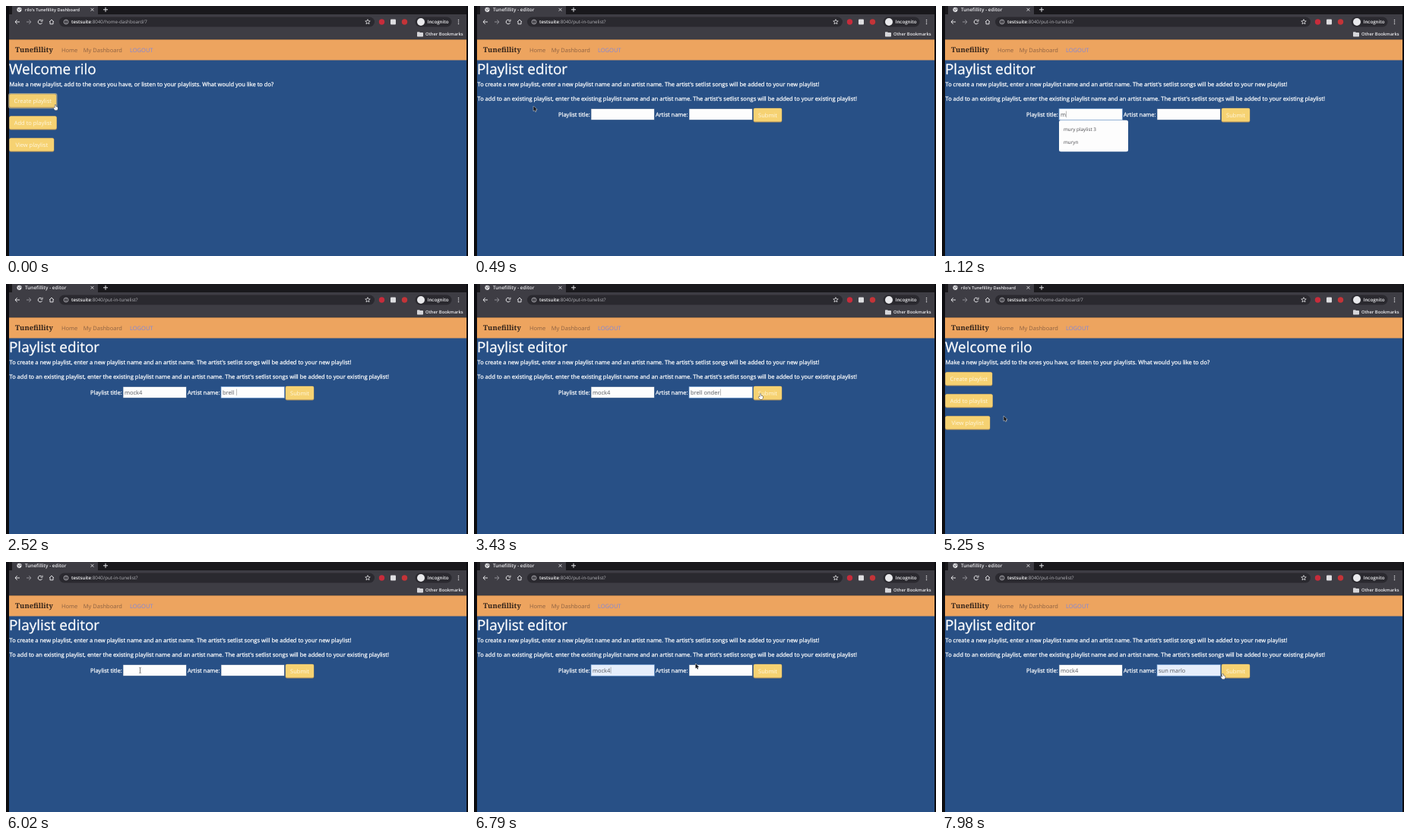
These frames come from a looping animation (608x330 px, 8 s). An HTML page with a canvas:

```html
<!DOCTYPE html>
<html lang="en">
<head>
<meta charset="utf-8">
<title>Playlist editor</title>
<style>
html, body { margin: 0; width: 100%; height: 100%; overflow: hidden; background: #0c0c10; }
canvas { display: block; width: 608px; height: 330px; }
</style>
</head>
<body>
<canvas id="stage"></canvas>
<script>
const W = 608, H = 330, LOOP = 8000;
const canvas = document.getElementById('stage');
const dpr = window.devicePixelRatio || 1;
canvas.width = W * dpr;
canvas.height = H * dpr;
const c = canvas.getContext('2d');
const SANS = '"Open Sans", "Noto Sans", sans-serif';
const SERIF = '"Noto Serif", serif';

const BRAND = 'Tunefillity';
const USER = 'rilo';
const TITLE = 'mock4';
const ARTIST1 = 'brell onder';
const ARTIST2 = 'sun marlo';
const TITLE_LIST = [TITLE, 'mury playlist 3', 'muryn', 'road trip', 'slow songs', 'night mix'];
const ARTIST_LIST = [ARTIST1, ARTIST2, 'the low tiles', 'ana verrin', 'pale harbor', 'mint orbit'];

const FIELDS = [{ x: 154.5, y: 136, w: 82.5, h: 14 }, { x: 283.5, y: 136, w: 82.5, h: 14 }];
const SUBMIT = { x: 368, y: 135, w: 37, h: 18, label: 'Submit' };
const MENU = [
  { x: 4.5, y: 116.5, w: 61.5, h: 17.5, label: 'Create playlist' },
  { x: 4.5, y: 145.5, w: 62, h: 17.5, label: 'Add to playlist' },
  { x: 4.5, y: 174.5, w: 58.5, h: 17.5, label: 'View playlist' }
];

// Pointer hot spot: time, x, y
const PATH = [
  [0, 65, 130.5], [300, 64, 130], [480, 78, 132], [820, 175, 143], [1740, 175, 143],
  [1880, 300, 144], [3060, 316, 145], [3380, 377, 145], [3620, 377, 145], [3850, 372, 147],
  [4200, 341, 160.5], [4420, 341, 160.5], [4720, 270, 185], [5000, 150, 212], [5400, 50, 157],
  [5680, 48, 156], [5980, 176.5, 143], [6520, 176.5, 143], [6640, 190, 163], [6700, 190, 163],
  [6790, 291.5, 134], [7050, 305, 143], [7320, 305, 143], [7480, 306, 180], [7560, 306, 180],
  [7900, 369.5, 147.5], [8000, 369.5, 147.5]
];

const between = (t, a, b) => t >= a && t < b;
const inside = (p, r) => p.x >= r.x && p.x <= r.x + r.w && p.y >= r.y && p.y <= r.y + r.h;

// Part of a string typed between two times
function typed(s, t, from, to) {
  const n = Math.floor((t - from) / (to - from) * (s.length - 1)) + 1;
  return s.slice(0, Math.max(0, n));
}

function pointer(t) {
  let i = 0;
  while (i < PATH.length - 2 && t >= PATH[i + 1][0]) i++;
  const [t0, x0, y0] = PATH[i], [t1, x1, y1] = PATH[i + 1];
  let k = (t - t0) / (t1 - t0);
  k = k * k * (3 - 2 * k);
  return { x: x0 + (x1 - x0) * k, y: y0 + (y1 - y0) * k };
}

function text(s, x, y, size, color, weight = 400, family = SANS) {
  c.font = `${weight} ${size}px ${family}`;
  c.fillStyle = color;
  c.fillText(s, x, y);
  return c.measureText(s).width;
}

// Page text, slightly thickened like smoothed screen type
function label(s, x, y, size = 7.53) {
  text(s, x, y, size, '#fff');
  c.strokeStyle = '#fff';
  c.lineWidth = 0.25;
  c.strokeText(s, x, y);
}

function rect(x, y, w, h, color) {
  c.fillStyle = color;
  c.fillRect(x, y, w, h);
}

function round(x, y, w, h, r, color) {
  c.beginPath();
  c.roundRect(x, y, w, h, r);
  c.fillStyle = color;
  c.fill();
}

function disc(x, y, r, color) {
  c.beginPath();
  c.arc(x, y, r, 0, 7);
  c.fillStyle = color;
  c.fill();
}

function line(points, color, width = 1) {
  c.beginPath();
  points.forEach(([x, y], i) => i ? c.lineTo(x, y) : c.moveTo(x, y));
  c.strokeStyle = color;
  c.lineWidth = width;
  c.stroke();
}

function arc(x, y, r, a, b, color, width = 1) {
  c.beginPath();
  c.arc(x, y, r, a, b);
  c.strokeStyle = color;
  c.lineWidth = width;
  c.stroke();
}

function cross(x, y, r, color, width) {
  line([[x - r, y - r], [x + r, y + r]], color, width);
  line([[x + r, y - r], [x - r, y + r]], color, width);
}

function star(x, y, r, color) {
  const pts = [];
  for (let i = 0; i <= 10; i++) {
    const a = -Math.PI / 2 + i * Math.PI / 5, q = i % 2 ? r * 0.45 : r;
    pts.push([x + q * Math.cos(a), y + q * Math.sin(a)]);
  }
  line(pts, color, 0.8);
}

function browser(t, onDash, loading) {
  const ink = '#e2e2e5', bar = '#3e3d44', pill = '#2a292f';
  rect(4, 0, 602, 11, '#19181c');
  round(8, -4, 113, 18, 3, bar);
  rect(4, 11, 602, 33.3, bar);

  if (loading) {
    const a = t / 160;
    arc(17.5, 4.8, 2.8, a, a + 4.5, '#c9ccd2', 1);
  } else {
    disc(17.5, 4.8, 3.1, '#e6e6e9');
    line([[15.6, 3.8], [17.4, 4.8], [16.8, 6.8]], '#55555b', 0.9);
    line([[18.2, 2.5], [18.8, 4.2], [20, 4.8]], '#55555b', 0.8);
  }
  if (onDash) text(`${USER}'s ${BRAND} Dashboard`, 25, 6.8, 5.6, '#ededf0', 600);
  else text(`${BRAND} - editor`, 25, 6.8, 6.4, '#ededf0', 600);
  cross(113.5, 4.8, 1.9, ink, 0.9);
  line([[128, 4.8], [134, 4.8]], ink);
  line([[131, 1.8], [131, 7.8]], ink);

  line([[18, 21], [12, 21]], ink);
  line([[14.7, 18.2], [12, 21], [14.7, 23.8]], ink);
  line([[27, 21], [33, 21]], '#8f8f95');
  line([[30.3, 18.2], [33, 21], [30.3, 23.8]], '#8f8f95');
  if (loading) cross(45, 21, 2.7, ink, 1.1);
  else {
    arc(45, 21, 2.8, 0.4, 5.4, ink, 1);
    line([[48, 17.7], [48, 20.2], [45.6, 20.2]], ink, 0.9);
  }
  line([[57, 21], [60, 18], [63, 21]], ink);
  line([[58, 20.5], [58, 23.8], [62, 23.8], [62, 20.5]], ink);

  round(70, 14.5, 415, 13, 6.5, pill);
  arc(79, 21, 2.9, 0, 7, '#c4c4c9', 0.8);
  line([[79, 20.5], [79, 22.7]], '#c4c4c9', 0.9);
  rect(78.6, 19, 0.9, 0.9, '#c4c4c9');
  const host = text('testsuite', 86, 23.3, 6.2, '#f4f4f6', 600);
  text(':8040/' + (onDash ? 'home-dashboard/7' : 'put-in-tunelist?'), 86 + host, 23.3, 6.2, '#b2b2b8');
  star(476, 21, 3.4, ink);

  disc(494.5, 21, 3.7, '#c72c3b');
  round(506, 17.5, 7, 7, 1, '#dedee1');
  disc(524.5, 21, 3.7, '#c43438');
  round(538.5, 14.5, 48, 13, 6.5, pill);
  disc(546, 21, 5, '#e9e9ec');
  text('Incognito', 554.5, 23.2, 6.2, '#f2f2f4', 600);
  for (const y of [18.5, 21, 23.5]) disc(595.5, y, 0.75, ink);

  round(541, 34.2, 3.6, 2, 0.5, '#d6d6da');
  round(541, 35, 8, 5.4, 0.7, '#d6d6da');
  text('Other Bookmarks', 552, 39.3, 5.8, '#ececef', 600);
}

function navbar() {
  rect(4, 44.3, 602, 27.2, '#eda45f');
  text(BRAND, 12, 61.3, 9.4, '#35251b', 600, SERIF);
  text('Home', 73, 61, 7.5, '#8c6143');
  text('My Dashboard', 101.8, 61, 7.5, '#8c6143');
  text('LOGOUT', 163, 60.7, 7.5, '#7c86e0', 500);
}

function button(b, active) {
  if (active) round(b.x - 1.5, b.y - 1.5, b.w + 3, b.h + 3, 3, 'rgba(214,203,164,.6)');
  round(b.x - 0.3, b.y - 0.2, b.w + 0.6, b.h + 0.6, 2, '#b9965a');
  round(b.x, b.y, b.w, b.h - 0.4, 2, active ? '#f2cf70' : '#f6d272');
  c.textAlign = 'center';
  text(b.label, b.x + b.w / 2, b.y + b.h / 2 + 2.8, 7.5, '#fff7e0');
  c.textAlign = 'left';
}

function field(f, value, focused, filled, caret) {
  const edge = focused ? 0.7 : 0.4;
  rect(f.x - edge, f.y - edge, f.w + 2 * edge, f.h + 2 * edge, focused ? '#8db4e2' : '#8796ab');
  rect(f.x, f.y, f.w, f.h, filled ? '#e6eefb' : '#fdfdfd');
  const w = text(value, f.x + 1.5, f.y + 9.6, 7.5, '#55585e');
  if (caret) rect(f.x + 2 + w, f.y + 2.6, 0.5, 8.6, '#777');
}

function dropdown(f, items, hot) {
  const h = items.length * 17 + 7.5;
  round(f.x - 0.5, 150.8, 91, h, 2.5, '#fdfdfd');
  items.forEach((s, i) => {
    const y = 154.5 + i * 17;
    if (i === hot) rect(f.x - 0.5, y, 91, 17, '#e8e8ea');
    text(s, f.x + 5.5, y + 10.7, 6.3, '#48484c');
  });
}

function dashboard(p) {
  label('Welcome ' + USER, 4, 89.6, 18.9);
  label('Make a new playlist, add to the ones you have, or listen to your playlists. What would you like to do?', 4.5, 106);
  MENU.forEach(b => button(b, inside(p, b)));
}

function formState(t) {
  const s = { title: '', artist: '', focus: -1, list: null, hot: -1, filled: -1 };
  if (t < 5000) {
    s.title = typed(TITLE, t, 1050, 1680);
    if (t < 1400) s.title = s.title.slice(0, 1);
    s.artist = t < 2500 ? typed(ARTIST1.slice(0, 6), t, 2170, 2490)
      : ARTIST1.slice(0, 6) + typed(ARTIST1.slice(6), t, 2620, 2980);
    s.focus = between(t, 900, 1880) ? 0 : between(t, 1880, 3550) ? 1 : -1;
    if (between(t, 900, 1050)) s.list = TITLE_LIST;
    else if (between(t, 1050, 1400)) s.list = TITLE_LIST.slice(1, 3);
    else if (between(t, 1900, 2170)) s.list = ARTIST_LIST;
  } else {
    s.title = t >= 6700 ? TITLE : '';
    s.artist = t >= 7540 ? ARTIST2 : '';
    s.focus = between(t, 6430, 7230) ? 0 : t >= 7230 ? 1 : -1;
    if (between(t, 6570, 6700)) s.list = TITLE_LIST;
    else if (between(t, 7270, 7540)) s.list = ARTIST_LIST;
    if (s.list) s.hot = t < 7000 ? (t > 6620 ? 0 : -1) : (t > 7440 ? 1 : -1);
    s.filled = between(t, 6700, 7230) ? 0 : t >= 7540 ? 1 : -1;
  }
  return s;
}

function editor(t) {
  const s = formState(t);
  label('Playlist editor', 4, 89.6, 18.9);
  label("To create a new playlist, enter a new playlist name and an artist name. The artist's setlist songs will be added to your new playlist!", 4.5, 106);
  label("To add to an existing playlist, enter the existing playlist name and an artist name. The artist's setlist songs will be added to your existing playlist!", 4.5, 124.6);
  label('Playlist title:', 111, 145.6);
  label('Artist name:', 239, 145.6);
  [s.title, s.artist].forEach((v, i) => {
    const focused = s.focus === i;
    field(FIELDS[i], v, focused, s.filled === i, focused && s.filled !== 1);
  });
  button(SUBMIT, between(t, 3550, 5000));
  if (s.list) dropdown(FIELDS[s.focus], s.list, s.hot);
}

function shape(points, fill, edge) {
  c.beginPath();
  points.forEach(([x, y], i) => i ? c.lineTo(x, y) : c.moveTo(x, y));
  c.closePath();
  c.lineJoin = 'round';
  c.strokeStyle = edge;
  c.lineWidth = 1;
  c.stroke();
  c.fillStyle = fill;
  c.fill();
}

function cursor(p, onDash) {
  const over = r => inside(p, r);
  c.save();
  c.translate(p.x, p.y);
  if (!onDash && FIELDS.some(over)) {
    line([[-1.3, -3.8], [0, -3.2], [1.3, -3.8]], '#555', 0.7);
    line([[0, -3.2], [0, 3.2]], '#555', 0.8);
    line([[-1.3, 3.8], [0, 3.2], [1.3, 3.8]], '#555', 0.7);
  } else if ((onDash ? MENU : [SUBMIT]).some(over)) {
    shape([[-0.6, 0], [0.5, 0], [0.7, 2.4], [3, 3], [3.2, 5], [2.4, 7], [-0.7, 7], [-2.6, 4.2], [-1.8, 3.6], [-0.6, 4.4]],
      '#fff', '#33363d');
  } else {
    shape([[0, 0], [0, 6.6], [1.5, 5.2], [2.5, 7.5], [3.6, 7], [2.6, 4.8], [4.7, 4.7]], '#17181c', '#eef0f4');
  }
  c.restore();
}

function draw(t) {
  c.setTransform(dpr, 0, 0, dpr, 0, 0);
  c.textRendering = 'geometricPrecision';
  c.lineJoin = 'round';
  const onDash = t < 430 || between(t, 4480, 5690);
  const toDash = between(t, 3700, 4480);
  const loading = toDash || between(t, 320, 430) || between(t, 5560, 5690);
  const p = pointer(t);
  rect(0, 0, W, H, '#0c0c10');
  rect(4, 45, 602, 285, '#285086');
  browser(t, onDash || toDash, loading);
  navbar();
  if (onDash) dashboard(p);
  else editor(t);
  const hidden = between(t, 1050, 1740) || between(t, 2170, 3060);
  if (!hidden) cursor(p, onDash);
}

const start = performance.now();
function tick() {
  draw((performance.now() - start) % LOOP);
  requestAnimationFrame(tick);
}
tick();
</script>
</body>
</html>
```
